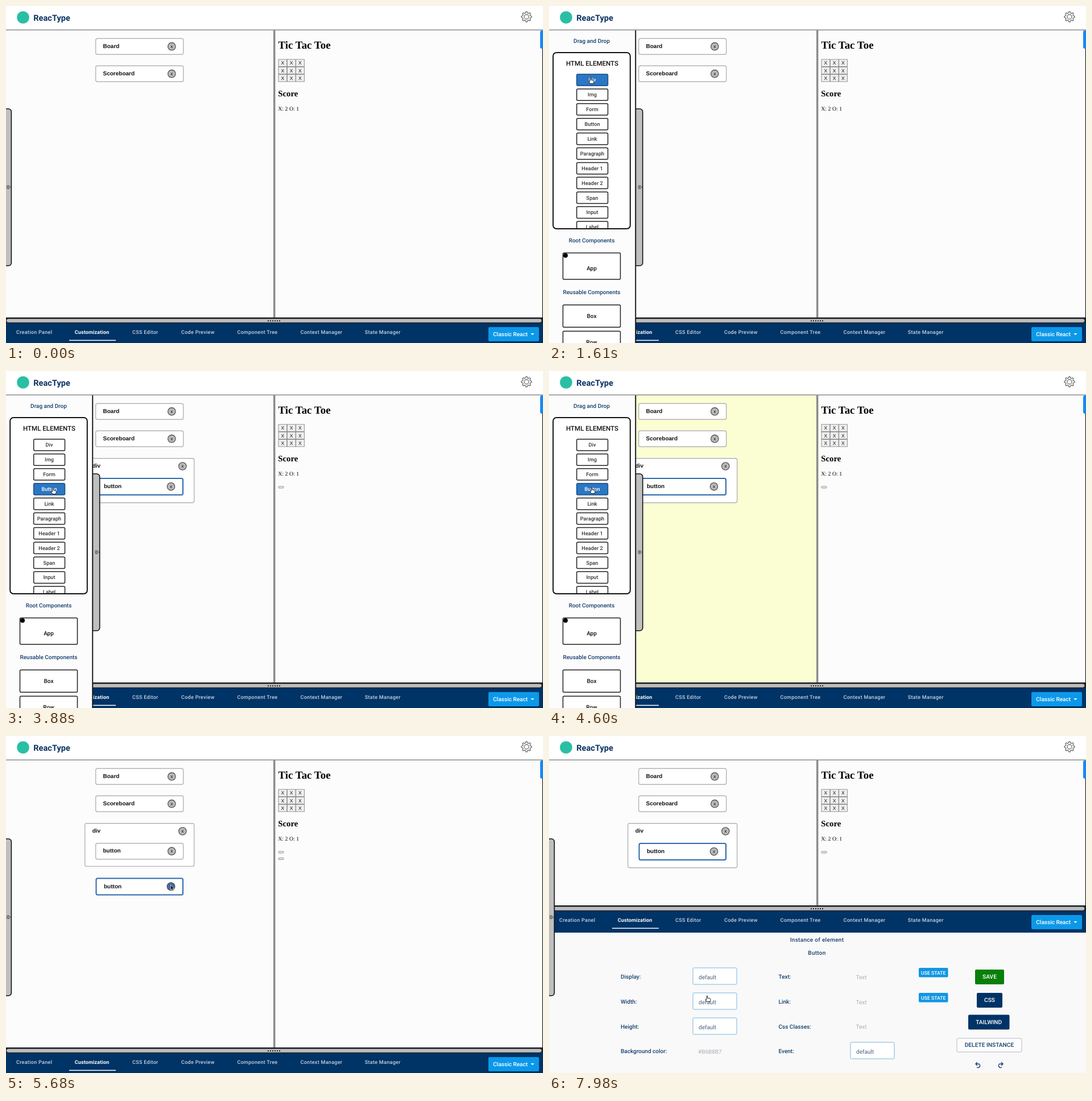
Animation of 944x593 px, one loop 8000 ms. Source, as an HTML page:

```html
<!DOCTYPE html>
<html lang="en">
<head>
<meta charset="utf-8">
<title>Component builder</title>
<style>
html, body { margin: 0; width: 100%; height: 100%; overflow: hidden; background: #fff; }
svg { display: block; width: 944px; height: 593px; }
text { font: 500 10px Roboto, sans-serif; fill: #17406f; text-rendering: geometricPrecision; white-space: pre; }
.mid { text-anchor: middle; }
.brand { font-size: 14.6px; font-weight: 700; fill: #0b3364; }
.card { font: 700 10px "Liberation Sans", Arial, sans-serif; fill: #111; }
.cross { font: 8.5px "Liberation Sans", Arial, sans-serif; fill: #111; text-anchor: middle; }
.serif { font: 9.8px "Liberation Serif", Times, serif; fill: #000; }
.h1 { font-size: 18.9px; font-weight: 700; }
.h2 { font-size: 14.8px; font-weight: 700; }
.caps { font-size: 11.5px; fill: #111; }
.item { font-size: 9.2px; fill: #333; }
.comp { fill: #111; }
.tab { font-size: 9px; letter-spacing: .3px; fill: #c9d3e0; }
.tab.on { font-weight: 700; letter-spacing: .15px; fill: #fff; }
.title { letter-spacing: .3px; }
.value { font-weight: 400; fill: #46617f; }
.hint { font-weight: 400; fill: #a9b0b8; }
.white { fill: #fff; }
.small { font-size: 8.7px; }
.action { font-size: 10.2px; }
.item-box { fill: #fff; stroke: #222; stroke-width: 1.5; }
.hover .item-box { fill: #2b77c3; stroke: #174f88; }
.hover text { fill: #fff; }
</style>
</head>
<body>
<svg id="stage" viewBox="0 0 944 593"></svg>
<script>
const LOOP = 8000;
const stage = document.getElementById('stage');

const rect = (x, y, w, h, fill, more = '') =>
  `<rect x="${x}" y="${y}" width="${w}" height="${h}" fill="${fill}" ${more}/>`;
const text = (x, y, s, cls = '') => `<text x="${x}" y="${y}" class="${cls}">${s}</text>`;
const path = (d, stroke, width = 1, fill = 'none') =>
  `<path d="${d}" fill="${fill}" stroke="${stroke}" stroke-width="${width}"/>`;
const during = (markup, ...spans) => `<g data-spans='${JSON.stringify(spans)}'>${markup}</g>`;

const cross = (x, y, fill = '#bababa') =>
  `<circle cx="${x}" cy="${y}" r="6.7" fill="${fill}" stroke="#555" stroke-width="1.3"/>` +
  text(x, y + 2.7, 'x', 'cross');

// A card's y is the top of its outer edge.
function card(label, y, focused = false) {
  return focused
    ? rect(158.5, y + 1, 152.5, 29, '#fff', 'rx="2.5" stroke="#2c69ad" stroke-width="2"') +
      text(172, y + 18, label, 'card') + cross(290, y + 15.3)
    : rect(157.7, y + .7, 154, 28, '#fff', 'rx="3" stroke="#b4b4b4" stroke-width="1.4"') +
      text(170.5, y + 17, label, 'card') + cross(291.3, y + 14.7);
}

function nest(focused) {
  return rect(138.7, 153.7, 192, focused ? 78 : 75.7, '#fff', 'rx="3" stroke="#b4b4b4" stroke-width="1.4"') +
    text(151.7, 170, 'div', 'card') + cross(310.3, 167.5) + card('button', 188, focused);
}

function canvas() {
  return rect(0, 42, 470, 507, '#fcfcfc') +
    during(rect(0, 42, 470, 507, '#fbfdd3'), [2050, 2320], [3330, 3770], [4600, 4980]) +
    card('Board', 56.5) + card('Scoreboard', 104.5) +
    during(card('div', 153, true), [2320, 3770]) +
    during(nest(true), [3770, 4980], [6790, LOOP]) +
    during(nest(false), [4980, 6790]) +
    during(card('button', 249.5, true), [4980, 6000]) +
    during(cross(290, 264.8, '#3f6fae'), [5600, 6000]);
}

function preview() {
  let cells = '';
  for (let i = 0; i < 9; i++) {
    const x = 479 + i % 3 * 15.3, y = 94 + Math.floor(i / 3) * 13.3;
    cells += rect(x, y, 14.8, 12.4, '#efefef', 'stroke="#858585" stroke-width=".9"') +
      text(x + 7.3, y + 9.2, 'X', 'cross');
  }
  const stub = y => rect(479, y, 9, 3, '#efefef', 'rx="1" stroke="#858585" stroke-width=".9"');
  return rect(470, 42, 474, 507, '#fcfcfc') + rect(470, 42, 3.4, 507, '#8a8a8a') +
    rect(942.8, 42, 1.2, 507, '#222') +
    rect(939, 43, 8, 32, '#1688f5', 'rx="3"') +
    text(478.5, 75, 'Tic Tac Toe', 'serif h1') + cells +
    text(478.3, 159, 'Score', 'serif h2') + text(478.3, 183.7, 'X: 2 O: 1', 'serif') +
    during(stub(203), [3770, LOOP]) + during(stub(214.5), [4980, 6000]);
}

function form() {
  const select = (x, y) =>
    rect(x, y, 77, 29, '#fff', 'rx="1.5" stroke="#79b5e2"') + text(x + 10, y + 20, 'default', 'value');
  const button = (x, y, w, h, label, fill, cls = 'white action', more = '') =>
    rect(x, y, w, h, fill, `rx="2" ${more}`) + text(x + w / 2, y + h / 2 + 3.4, label, 'mid ' + cls);
  const rows = [427, 471, 514.5, 558];
  const column = (x, labels) => labels.map((s, i) => text(x, rows[i], s)).join('');
  const turn = path('M750.5 577H756A3.6 3.6 0 1 1 752 583M753 574L750 577L753 580', '#17406f', 1.4);
  return text(471, 361.5, 'Instance of element', 'mid title') + text(471, 385, 'Button', 'mid title') +
    column(126, ['Display:', 'Width:', 'Height:', 'Background color:']) +
    column(403.5, ['Text:', 'Link:', 'Css Classes:', 'Event:']) +
    [408, 452, 496].map(y => select(253, y)).join('') + select(530, 539) +
    text(262, 558.5, '#B6B8B7', 'hint') +
    [427.7, 471.5, 515.3].map(y => text(539.5, y, 'Text', 'hint')).join('') +
    button(650, 408, 51.5, 16.5, 'USE STATE', '#1196e3', 'white small') +
    button(650, 452, 51.5, 16.5, 'USE STATE', '#1196e3', 'white small') +
    button(749, 411, 51, 26, 'SAVE', '#087f0b') +
    button(752, 452, 45, 26, 'CSS', '#003366') +
    button(737, 490.5, 72.5, 26, 'TAILWIND', '#003366') +
    button(717, 532, 114, 24, 'DELETE INSTANCE', '#fcfcfc', 'action', 'stroke="#b3bac3"') +
    turn + `<g transform="translate(1548 0) scale(-1 1)">${turn}</g>`;
}

function bottomPanel() {
  const tabs = [['Creation Panel', 18], ['Customization', 120.7], ['CSS Editor', 222], ['Code Preview', 308],
    ['Component Tree', 406.5], ['Context Manager', 517.5], ['State Manager', 630.7]];
  let dots = '';
  for (let i = 0; i < 6; i++) dots += rect(460 + i * 4, 553, 2, 2, '#222');
  return `<g id="panel">` +
    rect(0, 548, 944, 11, '#1b2530') +
    rect(.5, 550, 941.5, 7.3, '#bdbdbd', 'rx="3.6" stroke="#111"') + dots +
    rect(0, 558, 944, 38, '#003366') + rect(0, 596, 944, 260, '#f9f9f9') +
    tabs.map(([s, x], i) => text(x, 577.3, s, i === 1 ? 'tab on' : 'tab')).join('') +
    rect(111, 587.6, 82, 1.5, '#fff') +
    rect(848, 565, 89, 25, '#0c98e9', 'rx="2"') + text(856.3, 580.7, 'Classic React', 'white') +
    `<path d="M922.5 576h6l-3 3.2z" fill="#fff"/>` +
    `<g transform="translate(0 250)">${form()}</g></g>`;
}

const ITEMS = ['Div', 'Img', 'Form', 'Button', 'Link', 'Paragraph', 'Header 1', 'Header 2', 'Span', 'Input', 'Label'];
const itemTop = i => 120 + i * 25.9;

function drawer() {
  const items = ITEMS.map((s, i) => `<g class="entry">` +
    rect(48.7, itemTop(i), 54.8, 20.3, '#fff', 'rx="2" class="item-box"') +
    text(76, itemTop(i) + 13.3, s, 'mid item') + '</g>').join('');
  const box = (y, h) => rect(24.5, y, 101, h, '#fff', 'rx="2" stroke="#222" stroke-width="1.5"');
  return `<g id="drawer">` +
    rect(148, 181, 16.7, 276, '#bfbfbf', 'rx="5" stroke="#111" stroke-width="1.6"') +
    path('M157.3 315.5V322M159.3 315.7L163.3 318.8L159.3 322Z', '#444') +
    rect(-4, 42, 157, 551, '#fcfcfc') + rect(151.3, 42, 1.9, 551, '#111') +
    text(75, 65, 'Drag and Drop', 'mid') +
    `<clipPath id="list"><rect x="8" y="83" width="134" height="308"/></clipPath>` +
    rect(7.2, 82, 135.6, 310, '#fff', 'rx="6"') +
    text(76, 104.7, 'HTML ELEMENTS', 'mid caps') +
    `<g clip-path="url(#list)">${items}</g>` +
    rect(7.2, 82, 135.6, 310, 'none', 'rx="6" stroke="#111" stroke-width="2"') +
    text(75, 415.7, 'Root Components', 'mid') +
    box(434.5, 46.5) + '<circle cx="29" cy="439" r="4"/>' + text(75, 465, 'App', 'mid comp') +
    text(75, 507, 'Reusable Components', 'mid') +
    box(526, 39.3) + text(75, 549.3, 'Box', 'mid comp') +
    box(572.3, 39.3) + text(75, 595.3, 'Row', 'mid comp') + '</g>';
}

function header() {
  let gear = '';
  const teeth = 8;
  for (let i = 0; i < teeth * 4; i++) {
    const a = (i - .5) / (teeth * 4) * 2 * Math.PI, r = i % 4 < 2 ? 9 : 6.9;
    gear += `${i ? 'L' : 'M'}${(915 + r * Math.cos(a)).toFixed(1)} ${(19 + r * Math.sin(a)).toFixed(1)}`;
  }
  return rect(0, 0, 944, 42, '#fff') + rect(0, 41.4, 944, 1.5, '#8c8c8c') +
    '<circle cx="30" cy="20" r="10.8" fill="#2abfa4"/>' + text(48.3, 25.6, 'ReacType', 'brand') +
    path(gear + 'Z', '#737373', 1.4) + '<circle cx="915" cy="19" r="4" fill="none" stroke="#737373" stroke-width="1.3"/>';
}

const pointer = `<g id="cursor">
  <path id="arrow" d="M0 0V9L2 7.2L3.5 10.4L5 9.7L3.5 6.6H6.2Z" fill="#111" stroke="#fff" stroke-width=".7"/>
  <path id="hand" d="M-.9 .8Q0 -.6 .9 .8V4L5 4.8Q6.3 5.2 6 6.8L5.2 10.5H-.5L-3.2 6.5Q-3 5.3 -.9 6.6Z" fill="#fff" stroke="#111" stroke-width=".9"/>
</g>`;

stage.innerHTML = canvas() + preview() + bottomPanel() + drawer() + header() + pointer;

// Each row: time, then values; rows are joined with a smooth step.
const CURSOR = [
  [110, 614, 330], [600, 5, 322], [1000, 5, 316], [1560, 73, 126], [2320, 73, 126], [2500, 52, 168],
  [2700, 83, 206], [3770, 83, 206], [4380, 75, 205], [5030, 75, 205], [5660, 289.5, 262], [6050, 289.5, 262],
  [6460, 240, 209], [7150, 240, 209], [7460, 174, 544], [7500, 174, 544], [7590, 154, 572], [7760, 154, 572],
  [7925, 237, 487], [7975, 278, 457]];
const DRAWER = [[600, -155.3], [1080, 0], [5190, 0], [5600, -155.3]];
const PANEL = [[7600, 0], [7890, -250]];

function sample(track, t) {
  const next = track.findIndex(row => row[0] > t);
  if (next < 0) return track[track.length - 1].slice(1);
  if (next === 0) return track[0].slice(1);
  const a = track[next - 1], b = track[next];
  const u = (t - a[0]) / (b[0] - a[0]), k = u * u * (3 - 2 * u);
  return a.slice(1).map((v, i) => v + (b[i + 1] - v) * k);
}

const byId = id => document.getElementById(id);
const [panelEl, drawerEl, cursorEl, arrowEl, handEl] = ['panel', 'drawer', 'cursor', 'arrow', 'hand'].map(byId);
const entries = [...document.querySelectorAll('.entry')];
const timed = [...document.querySelectorAll('[data-spans]')]
  .map(el => ({ el, spans: JSON.parse(el.dataset.spans) }));
const toggle = (el, on) => { el.style.display = on ? '' : 'none'; };

function draw(t) {
  const [x, y] = sample(CURSOR, t), [dx] = sample(DRAWER, t), [dy] = sample(PANEL, t);
  for (const { el, spans } of timed) toggle(el, spans.some(([from, to]) => t >= from && t < to));
  drawerEl.setAttribute('transform', `translate(${dx} 0)`);
  panelEl.setAttribute('transform', `translate(0 ${dy})`);
  cursorEl.setAttribute('transform', `translate(${x} ${y})`);
  toggle(cursorEl, t >= 110);

  let onItem = false;
  entries.forEach((el, i) => {
    const hit = x > 48 + dx && x < 104 + dx && y > itemTop(i) && y < itemTop(i) + 20.3;
    el.classList.toggle('hover', hit);
    onItem = onItem || hit;
  });
  const hand = onItem || t >= 7960;
  toggle(handEl, hand);
  toggle(arrowEl, !hand);
}

function tick() {
  draw(performance.now() % LOOP);
  requestAnimationFrame(tick);
}
tick();
</script>
</body>
</html>
```
